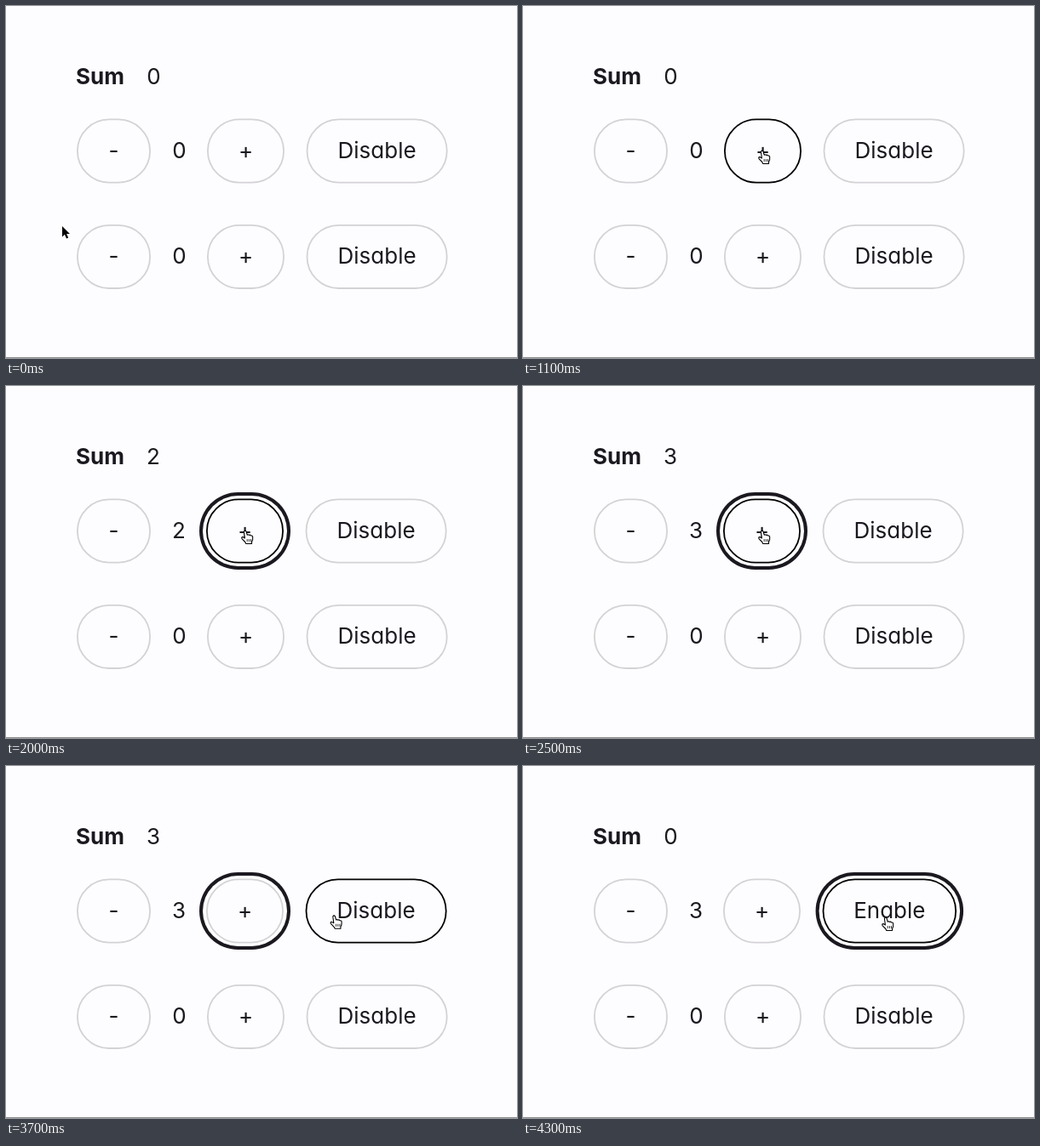
These frames come from a looping animation (600 by 414 pixels, 5 s). An HTML page:

```html
<!DOCTYPE html>
<html lang="en">
<head>
<meta charset="utf-8">
<title>Counters with a sum</title>
<style>
  html, body { margin: 0; width: 100%; height: 100%; overflow: hidden; background: #fdfcff; }
  svg { display: block; width: 100vw; height: 100vh; }
  text { font: 400 26px Inter, "Open Sans", sans-serif; font-feature-settings: "cv11"; fill: #1b191f; }
  .mid { text-anchor: middle; }
  .bold { font-weight: 700; }
</style>
</head>
<body>
<svg id="stage" viewBox="0 0 600 414"></svg>
<script>
const LOOP = 5000, STEP = 100;
const LEFT = 83, TOP = 133, ROW_GAP = 124.4, HEIGHT = 75;
const BG = '#fdfcff', INK = '#1b191f';
const DIGIT_WIDTH = [15, 8, 14, 14];
const stage = document.getElementById('stage');

function add(parent, tag, attrs = {}, text = '') {
  const el = document.createElementNS('http://www.w3.org/2000/svg', tag);
  set(el, attrs);
  el.textContent = text;
  parent.append(el);
  return el;
}

function set(el, attrs) {
  for (const key in attrs) el.setAttribute(key, attrs[key]);
}

// Value of the last [time, ...values] entry that has been reached.
const at = (keys, t) => keys.filter(k => k[0] <= t).pop().slice(1);

function makeButton(y) {
  const outer = add(stage, 'rect', { fill: INK });
  const inner = add(stage, 'rect', { fill: '#fff' });
  const face = add(stage, 'rect', { fill: BG, 'stroke-width': 1.8 });
  const label = add(stage, 'text', { class: 'mid' });

  function spread(rect, x, w, d, opacity) {
    set(rect, {
      x: x - d, y: y - d, width: w + 2 * d, height: HEIGHT + 2 * d,
      rx: HEIGHT / 2 + d, opacity
    });
  }

  return (x, w, text, hover = false, focus = 0) => {
    spread(outer, x, w, 8 * focus, focus);
    spread(inner, x, w, 4 * focus, focus);
    spread(face, x + 0.5, w - 1, -0.4, 1);
    face.setAttribute('stroke', hover ? '#000' : '#d3d2d5');
    label.textContent = text;
    set(label, { x: x + w / 2, y: y + 46, fill: hover ? '#000' : INK });
  };
}

function makeRow(y) {
  const minus = makeButton(y), plus = makeButton(y), toggle = makeButton(y);
  const count = add(stage, 'text', { class: 'mid', y: y + 46 });
  return (value, label, hover, plusFocus, toggleFocus) => {
    const w = DIGIT_WIDTH[value];
    minus(LEFT, 87, '-');
    count.textContent = value;
    count.setAttribute('x', 196 + w / 2);
    plus(221 + w, 91, '+', hover === 'plus', plusFocus);
    toggle(337.6 + w, label === 'Enable' ? 157.5 : 166, label, hover === 'toggle', toggleFocus);
  };
}

add(stage, 'rect', { width: 600, height: 414, fill: BG });
add(stage, 'rect', { y: 413, width: 600, height: 1, fill: '#8c8b8e' });
add(stage, 'text', { class: 'bold', x: LEFT - 1, y: 92 }, 'Sum');
const sum = add(stage, 'text', { class: 'mid', y: 92 });
const firstRow = makeRow(TOP);
const secondRow = makeRow(TOP + ROW_GAP);
secondRow(0, 'Disable', '', 0, 0);

const arrow = add(stage, 'path', {
  d: 'M0 0V12.4L2.9 9.8L5 14.6L7.2 13.6L5.1 9H9Z',
  fill: '#000', stroke: '#fff', 'stroke-width': 1, 'paint-order': 'stroke'
});
const hand = add(stage, 'g', {
  fill: '#fff', stroke: '#000', 'stroke-width': 1.1, 'stroke-linejoin': 'round'
});
add(hand, 'path', {
  d: 'M-1.6 1.2Q-.3-.8 1 1L2.2 5.2Q3.5 4.3 4.4 5.4Q5.8 4.7 6.5 6Q8.5 5.6 8.7 7.5' +
     'L8.6 11L7.5 13.5V15.5H.8L-.2 13.5L-3.8 9.8Q-5 7.8-3 7.6L-.6 9Z'
});
add(hand, 'path', { d: 'M2.2 10v3M4.4 10v3M6.5 10v3', 'stroke-width': 0.8 });

// Each move: start time, start point, end point, share of the way at each step.
const moves = [
  { t: 0, from: [66, 259], to: [280, 169.5], way: [0, 0.06, 0.3, 0.68, 0.93, 1] },
  { t: 700, from: [281, 170], to: [281, 170], way: [1] },
  { t: 3400, from: [281, 170], to: [426, 178], way: [0.02, 0.12, 0.38, 0.72, 0.94, 1] }
];
const counts = [[0, 0], [1500, 1], [2000, 2], [2500, 3]];
const plusFocus = [[0, 0], [1400, 0.08], [1500, 0.75], [1600, 1], [4100, 0.91], [4200, 0.25], [4300, 0]];
const toggleFocus = [[0, 0], [4100, 0.06], [4200, 0.75], [4300, 1]];

function pointer(t) {
  const { t: start, from, to, way } = moves.filter(m => m.t <= t).pop();
  const k = way[Math.min((t - start) / STEP, way.length - 1)];
  return from.map((v, i) => v + (to[i] - v) * k);
}

function draw(time) {
  const t = Math.floor((time % LOOP) / STEP) * STEP;
  const [value] = at(counts, t);
  const off = t >= 4200;
  const [x, y] = pointer(t);
  const w = DIGIT_WIDTH[value];
  const inside = y > TOP && y < TOP + HEIGHT;
  const hover = !inside ? '' :
    x > 221 + w && x < 312 + w ? 'plus' :
    x > 337.6 + w ? 'toggle' : '';

  const total = off ? 0 : value;
  sum.textContent = total;
  sum.setAttribute('x', 166 + DIGIT_WIDTH[total] / 2);
  firstRow(value, off ? 'Enable' : 'Disable', hover, at(plusFocus, t)[0], at(toggleFocus, t)[0]);

  const place = `translate(${x} ${y})`;
  set(arrow, { transform: place, visibility: hover ? 'hidden' : 'visible' });
  set(hand, { transform: place, visibility: hover ? 'visible' : 'hidden' });
}

const begin = performance.now();
function tick() {
  draw(performance.now() - begin);
  requestAnimationFrame(tick);
}
tick();
</script>
</body>
</html>
```
